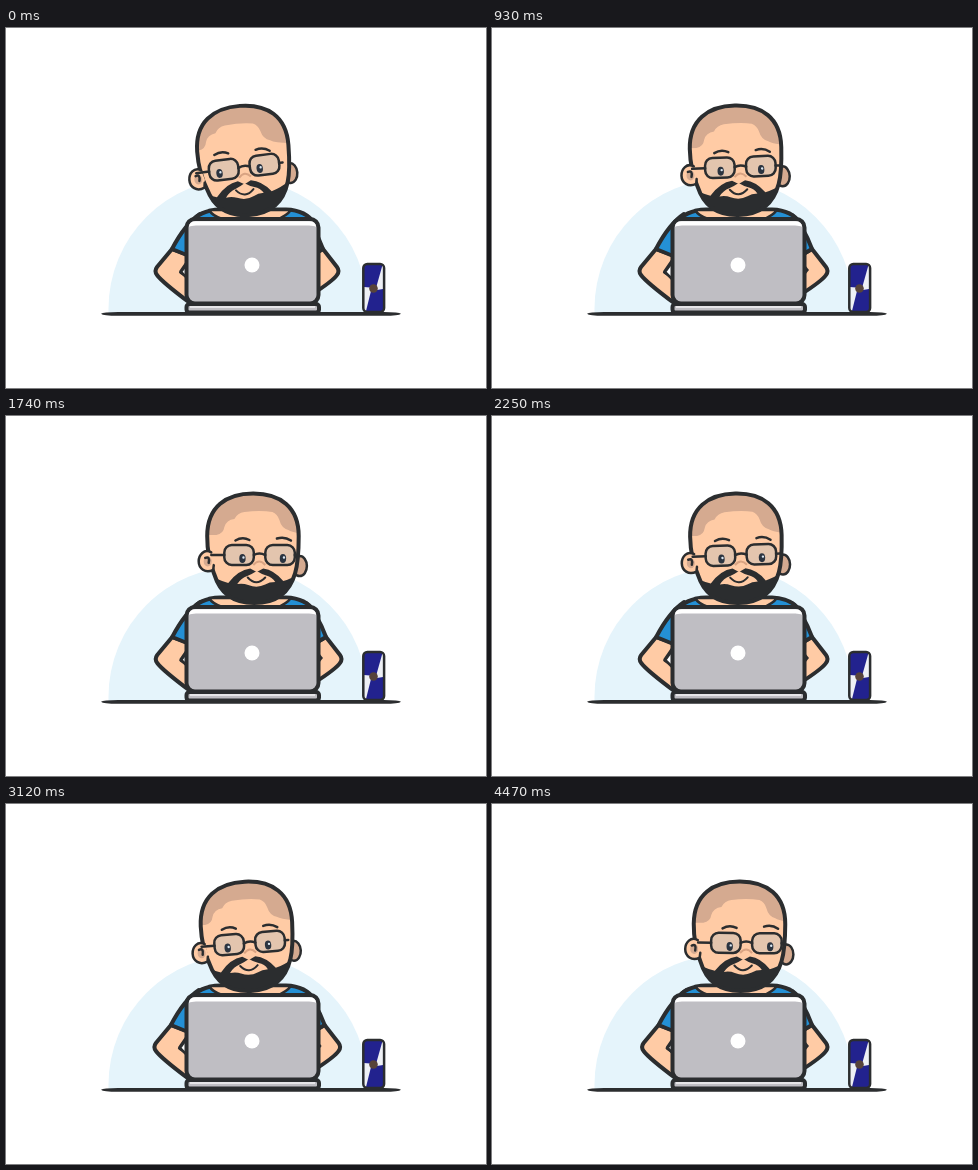
Write an HTML page that moves like this. It is 480 px wide and 360 px high and loops after 4500 ms.

```html
<!DOCTYPE html>
<html lang="en">
<head>
<meta charset="utf-8">
<title>At the laptop</title>
<style>
  /* --q is the head turn: -0.93 far left, 0 upright */
  @property --q { syntax: "<number>"; inherits: true; initial-value: -0.93; }

  html, body { margin: 0; width: 100%; height: 100%; overflow: hidden; background: #fff; }
  svg { display: block; width: 100%; height: 100%; animation: turn 4.5s ease-in-out infinite; }

  @keyframes turn {
    0% { --q: -.93; }
    14.5%, 20.7% { --q: -.3; }
    34.2% { --q: .07; }
    50.9% { --q: -.27; }
    61.3% { --q: -.93; }
    76.7%, 82% { --q: -.3; }
    98%, 100% { --q: .07; }
  }

  .head {
    transform-origin: 250px 185px;
    transform: translateX(calc(var(--q) * 5.5px - 2px)) rotate(calc(var(--q) * 4.6deg));
  }
  .ear-l { transform: translate(calc(var(--q) * 1.5px), calc(var(--q) * -2.5px)); }
  .ear-r { transform: translate(calc(var(--q) * 1.5px), calc(var(--q) * 2px)); }
  .hair { transform: translateX(calc(var(--q) * 8px)); }
  .brows { transform: translateX(calc(var(--q) * 12px)); }
  .beard { transform: translateX(calc(var(--q) * 5px)); }
  .glasses, .eyes { transform-origin: 255px 141px; }
  .glasses { transform: translateX(calc(var(--q) * 7px)) rotate(calc(var(--q) * 3deg)); }
  .eyes { transform: translateX(calc(var(--q) * 15.5px)) rotate(calc(var(--q) * 3deg)); }
  .arm-l { transform: translateX(max(calc((var(--q) + .3) * -3.2px), calc((var(--q) + .3) * 7px))); }
  .arm-r { transform: translateX(min(0px, calc((var(--q) + .3) * 4.8px))); }

  .line { stroke: #2b2d2f; stroke-width: 4; stroke-linejoin: round; stroke-linecap: round; }
  .thin { stroke-width: 2.5; }
  .none { fill: none; }
  .skin { fill: #ffcba5; }
  .shade { fill: #d5aa90; }
  .shirt { fill: #2490d5; }
  .dark { fill: #2b2d2f; }
  .lens { fill: #e3c5ae; }
  .metal { fill: #bfbec3; }
  .blue { fill: #22228e; }
  .white { fill: #fff; }
</style>
</head>
<body>
<svg viewBox="0 0 480 360">
  <defs>
    <path id="skull" d="M203 120C203 91 222 77.5 249 77.5S294.5 91 294.5 120C294.5 135 294 147 291 157C285 178 270 187 250 187S216 178 210 158C205 146 203 135 203 120Z"/>
    <clipPath id="face"><use href="#skull"/></clipPath>
  </defs>

  <path fill="#e5f4fb" d="M102.5 285V280.5A129.5 129.5 0 0 1 361.5 280.5V285Z"/>

  <!-- arms and shoulders -->
  <g class="arm-l">
    <path class="skin line" d="M164 221L149 239Q146 243 149 247Q154 254 182 275L190 255L173 244L184 228Z"/>
    <path class="white line thin" d="M184 229L173 244L184 255Z"/>
    <path class="shirt line" d="M192 186Q177 196 164 221L186 230Z"/>
  </g>
  <g class="arm-r">
    <path class="skin line" d="M320 221L334 239Q337 243 334 247Q330 253 308 267V228Z"/>
    <path class="dark" d="M309 232L317 242L309 252Z"/>
    <path class="shirt line" d="M300 187Q311 197 320 221L306 229Z"/>
  </g>
  <path class="shirt line" d="M184 196Q193 182 214 181.5H280Q300 182 309 196Z"/>
  <path class="skin line thin" d="M203 182Q210 194 246 196Q276 194 285 182Z"/>

  <g class="head">
    <ellipse class="ear-r shade line thin" cx="295.5" cy="150" rx="7.2" ry="10"/>
    <use href="#skull" class="skin"/>
    <g clip-path="url(#face)">
      <path class="shade hair" d="M190 119H212Q219 118 220 111Q222 104 230 103Q233 97 240 96Q256 94 268 96Q273 98 275 104Q277 112 284 114Q290 118 315 119V70H190Z"/>
      <g class="beard">
        <path class="dark" d="M194 150Q208 163 224 167Q234 154 246 152.5L252.5 156L259 152.5Q270 154 279 165Q291 162 308 148V195H194Z"/>
        <path class="skin" d="M252.5 155Q248 158 243 160Q237 162 233 168Q239 167 244 169Q253 172.5 261 168.5Q265 166 271 166Q268 161 262 159.5Q257 158 252.5 155Z"/>
        <path class="none line" style="stroke-width:2" d="M243.5 161.5Q252 171 261 161.5"/>
      </g>
    </g>
    <use href="#skull" class="none line"/>

    <g class="ear-l">
      <path class="skin line thin" stroke-dasharray="44 60" d="M207 136.5C200 132.5 194.5 139 194.5 145.5C194.5 152.5 201 158 209 154L210 146Z"/>
      <ellipse class="shade" cx="203.5" cy="145.5" rx="4" ry="5"/>
      <path class="none line thin" d="M201 142Q206 140 204.5 147"/>
    </g>

    <g class="brows none line thin">
      <path d="M231 124.5Q238 120.5 245 124"/>
      <path d="M272.5 122.5Q280 120 286.5 124.5"/>
    </g>
    <g class="glasses">
      <path class="none" stroke="#d9a382" stroke-width="2" d="M249 149Q255 142 261 149"/>
      <g class="lens line thin">
        <rect x="220" y="129" width="29.5" height="20" rx="7.5"/>
        <rect x="261" y="129" width="29.5" height="20" rx="7.5"/>
      </g>
      <path class="none line thin" d="M249.5 139Q255 136 261 139M220 139L207 139M290.5 139L294 139"/>
    </g>
    <g class="eyes">
      <ellipse fill="#2b3440" cx="238" cy="142.5" rx="3.2" ry="4.5"/>
      <ellipse fill="#2b3440" cx="278.5" cy="142.5" rx="3.2" ry="4.5"/>
      <circle fill="#dbe8f2" cx="239" cy="141.5" r="1.2"/>
      <circle fill="#dbe8f2" cx="279.5" cy="141.5" r="1.2"/>
    </g>
  </g>

  <!-- laptop -->
  <rect class="metal line" x="180.5" y="191" width="132" height="84.5" rx="8.5"/>
  <path class="white" d="M183 199Q183 193.2 190 193.2H303Q310 193.2 310 199Q308 197.5 303 197.5H190Q185 197.5 183 199Z"/>
  <circle class="white" cx="246" cy="237" r="7.5"/>
  <rect class="metal line" x="180.5" y="276" width="132.5" height="8.5" rx="3"/>
  <path class="none" stroke="#e6e5e8" stroke-width="2" d="M184 279H309"/>

  <!-- can -->
  <rect x="357.3" y="236" width="20.8" height="48" rx="4" fill="#eef0f5"/>
  <path class="blue" d="M358 237H376.5L370 260L358 259Z"/>
  <path class="blue" d="M365 263L377 261V283H360Z"/>
  <rect class="none line thin" x="357.3" y="236" width="20.8" height="48" rx="4"/>
  <circle fill="#57433a" cx="367.5" cy="260.5" r="4.3"/>

  <path class="dark" d="M95 285.8Q97 283.9 112 283.9H378Q393 283.9 395 285.8Q393 287.8 378 287.8H112Q97 287.8 95 285.8Z"/>
</svg>
</body>
</html>
```
